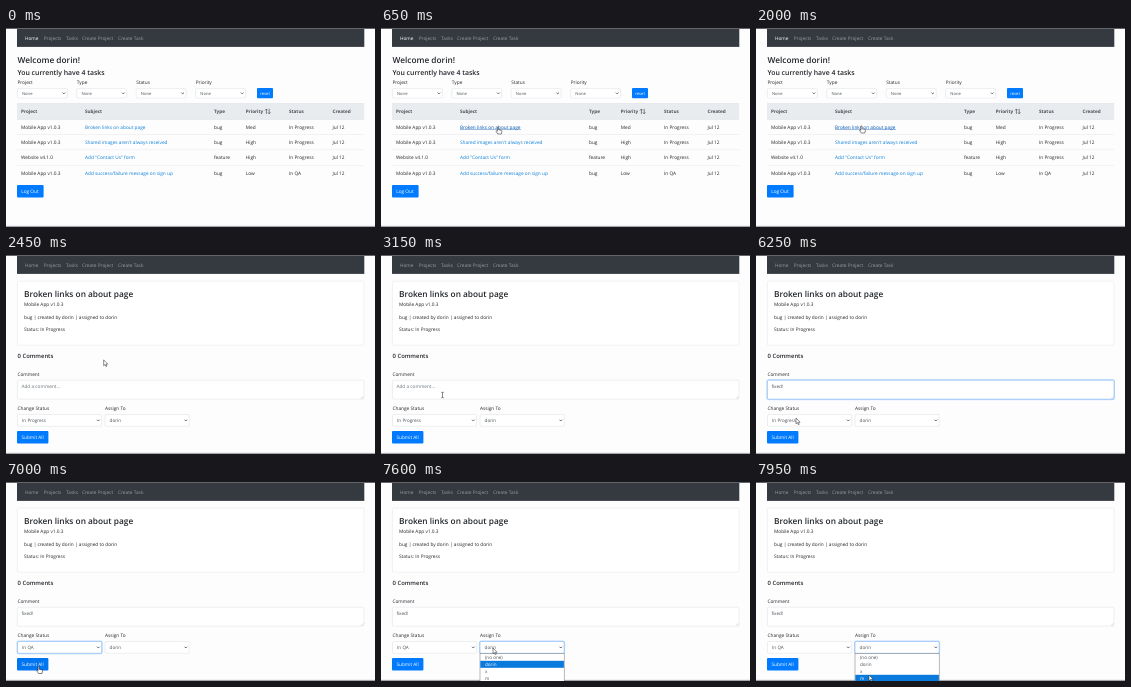
These frames come from a looping animation (369x199 px, 8000 ms). An HTML page:

```html
<!DOCTYPE html>
<html lang="en">
<head>
<meta charset="utf-8">
<title>Task tracker</title>
<style>
  html, body { margin: 0; width: 100%; height: 100%; overflow: hidden; background: #fefdfe; }
  svg { display: block; width: 369px; height: 199px; }
  text { font: 4.75px 'Open Sans', 'Noto Sans', sans-serif; fill: #212529; text-rendering: geometricPrecision; white-space: pre; }
  .h1 { font-size: 8.3px; font-weight: 600; }
  .h2 { font-size: 6.9px; font-weight: 600; }
  .h3 { font-size: 5.9px; font-weight: 600; }
  .th { font-size: 4.65px; font-weight: 700; fill: #495057; }
  .field { font-size: 4.6px; fill: #495057; }
  .small { font-size: 4.15px; }
  .nav { fill: #9a9da0; }
  .white { fill: #fff; }
  .hint { fill: #6c757d; }
  .link { fill: #0a7fd8; }
</style>
</head>
<body>
<svg id="stage" viewBox="0 0 369 199"></svg>
<script>
const LOOP = 8000, STEP = 50, USER = 'dorin';
const BLUE = '#007bff', BORDER = '#ced4da';

// Markup helpers
const text = (x, y, s, cls = '', id = '') => `<text x="${x}" y="${y}" class="${cls}" id="${id}">${s}</text>`;
const rect = (x, y, w, h, fill, extra = '') => `<rect x="${x}" y="${y}" width="${w}" height="${h}" fill="${fill}" ${extra}/>`;
const path = (d, stroke, width = 0.5, fill = 'none', extra = '') =>
  `<path d="${d}" stroke="${stroke}" stroke-width="${width}" fill="${fill}" ${extra}/>`;
const group = (id, body) => `<g id="${id}">${body}</g>`;
const box = (x, y, w, h, stroke = BORDER) => rect(x, y, w, h, '#fff', `rx="1.2" stroke="${stroke}" stroke-width=".4"`);
const chevron = (x, y) => path(`M${x - 1.3} ${y - 0.7}l1.3 1.3l1.3-1.3`, '#343a40', 0.75);
const button = (x, y, w, h, tx, ty, s, cls = 'white', id = '') =>
  rect(x, y, w, h, BLUE, `rx="1" id="${id}"`) + text(tx, ty, s, cls);
const select = (x, y, w, h, s, cls = 'field', id = '') =>
  box(x, y, w, h) + text(x + 4.6, y + h / 2 + 1.6, s, cls, id) + chevron(x + w - 3.4, y + h / 2);
const focusRing = (id, x, y, w, h) => group(id,
  rect(x - 0.5, y - 0.5, w + 1, h + 1, 'none', 'rx="1.6" stroke="#007bff" stroke-opacity=".25" stroke-width="1"') +
  rect(x, y, w, h, 'none', 'rx="1.2" stroke="#80bdff" stroke-width=".5"'));

const ROW = 7;
const menu = (id, x, options) => group(id,
  rect(x, 171.6, 84.2, options.length * ROW + 0.4, '#fff', 'stroke="#767676" stroke-width=".5"') +
  rect(x + 0.3, 171.8, 83.6, ROW, '#0a7adc', `id="${id}Mark"`) +
  options.map((s, i) => text(x + 5, 176.7 + i * ROW, s, 'field')).join(''));

function frameBars() {
  return rect(0, 0, 369, 0.8, '#3c4045') + rect(0, 197.9, 369, 0.8, '#85878a');
}

function navbar() {
  const items = [[19, 'Home'], [37.7, 'Projects'], [60, 'Tasks'], [76, 'Create Project'], [112, 'Create Task']];
  return rect(11, 1, 347.3, 17.9, '#343a40') +
    items.map(([x, s], i) => text(x, 12, s, 'nav', i ? '' : 'home')).join('');
}

function listPage() {
  const cols = [15, 79, 208, 239.7, 283, 326.5];
  const rows = [
    ['Mobile App v1.0.3', 'Broken links on about page', 'bug', 'Med', 'In Progress', 'Jul 12'],
    ['Mobile App v1.0.3', "Shared images aren't always received", 'bug', 'High', 'In Progress', 'Jul 12'],
    ['Website v4.1.0', 'Add "Contact Us" form', 'feature', 'High', 'In Progress', 'Jul 12'],
    ['Mobile App v1.0.3', 'Add success/failure message on sign up', 'bug', 'Low', 'In QA', 'Jul 12']
  ];
  const filters = [[11.4, 'Project'], [70.8, 'Type'], [130.2, 'Status'], [189.7, 'Priority']];
  const heads = ['Project', 'Subject', 'Type', 'Priority', 'Status', 'Created'];
  let out = text(11.5, 35.2, `Welcome ${USER}!`, 'h1') + text(11.5, 46.6, 'You currently have 4 tasks', 'h2');
  for (const [x, s] of filters)
    out += text(x, 56.2, s) + select(x, 60.6, 49.9, 9.4, 'None', 'field small');
  out += button(251, 60, 16, 10.2, 254.2, 66.7, 'reset', 'white small');
  out += rect(11, 75.2, 347.2, 16.1, '#e9ecef') + rect(11, 75.2, 347.2, 0.4, '#dee2e6') + rect(11, 90.9, 347.2, 0.6, '#d9dde1');
  heads.forEach((s, i) => { out += text(cols[i], 85, s, 'th'); });
  out += path('M260.4 86v-5m-1.3 1.4l1.3-1.4l1.3 1.4M263.2 80.8v5m-1.3-1.4l1.3 1.4l1.3-1.4', '#343a40', 0.6);
  rows.forEach((row, r) => {
    const y = 100.8 + r * 15.3;
    if (r) out += rect(11, y - 9.7, 347.2, 0.4, '#dee2e6');
    row.forEach((s, c) => { out += text(cols[c], y, s, c === 1 ? 'link' : '', c === 1 && !r ? 'task' : ''); });
  });
  out += group('underline', rect(79, 101.3, 61, 0.4, '#0056b3'));
  return out + button(11, 157, 26.6, 12.4, 15.2, 164.7, 'Log Out');
}

function detailPage() {
  const card = rect(11.4, 26.2, 346.6, 64, '#fff', 'id="card" rx="1.2" stroke="#dcdcde" stroke-width=".4"');
  const summary = group('summary', text(18, 41.5, 'Broken links on about page', 'h1') + text(18, 51.4, 'Mobile App v1.0.3'));
  const form = group('form',
    text(18, 64, '', '', 'meta') + text(18, 76.4, '', '', 'state') +
    text(11.5, 103.4, '0 Comments', 'h3') +
    text(11.5, 120.6, 'Comment') +
    box(11.4, 125.2, 346.6, 19) +
    focusRing('noteRing', 11.4, 125.2, 346.6, 19) +
    path('M355 143.6l2.2-2.2M356.4 143.6l.8-.8', '#888', 0.3) +
    text(15.4, 132.7, '', 'field', 'note') + rect(0, 128.3, 0.4, 5.3, '#333', 'id="caret"') +
    text(11.5, 155, 'Change Status') + text(99, 155, 'Assign To') +
    select(11.5, 159.5, 84.2, 11.8, 'In Progress', 'field', 'status') +
    select(99, 159.5, 84.2, 11.8, USER, 'field', 'assignee') +
    focusRing('statusRing', 11.5, 159.5, 84.2, 11.8) +
    focusRing('assignRing', 99, 159.5, 84.2, 11.8) +
    button(11, 176, 31.4, 12.4, 15.4, 183.8, 'Submit All', 'white', 'submit'));
  return card + summary + form;
}

function pointers() {
  const hand = 'M-.6 .2Q0-.5 .6 .2V2.8L3.4 3.4Q4 3.6 3.9 4.4L3.3 7H-.2L-2 4.2Q-1.8 3.3-.6 4.2Z';
  return group('arrow', path('M0 0V5.8L1.4 4.6L2.3 6.7L3.2 6.3L2.3 4.3H4.1Z', '#222', 0.5, '#fff')) +
    group('hand', path(hand, '#111', 0.5, '#fff')) +
    group('beam', path('M-1.2-2.8Q0-2.8 0-2.2Q0-2.8 1.2-2.8M0-2.4V2.4M-1.2 2.8Q0 2.8 0 2.2Q0 2.8 1.2 2.8', '#222', 0.55));
}

document.getElementById('stage').innerHTML =
  rect(0, 0, 369, 199, '#fefdfe') + navbar() +
  group('list', listPage()) + group('detail', detailPage()) + frameBars() +
  menu('statusMenu', 11.5, ['In Progress', 'In QA', 'Done']) +
  menu('assignMenu', 99, ['(no one)', USER, 'x', 'm']) +
  group('cursor', pointers());

const el = Object.fromEntries([...document.querySelectorAll('[id]')].filter(e => e.id).map(e => [e.id, e]));
const show = (id, on) => { el[id].style.display = on ? '' : 'none'; };
const clamp = v => Math.max(0, Math.min(1, v));
const during = (t, a, b) => t >= a && t < b;

// Pointer stops: time, x, y
const MOVES = [
  [250, 158, 173], [450, 140, 126], [650, 117, 99], [1150, 117, 99], [1200, 106, 98], [1800, 106, 98], [1850, 105.5, 98],
  [2350, 105.5, 98], [2700, 78, 122], [3150, 61.5, 140], [3500, 61.5, 140], [3700, 55.5, 133],
  [5600, 55.5, 133], [6000, 40.5, 156], [6100, 40.5, 156], [6250, 40, 163], [6350, 40, 165], [6600, 35, 181],
  [6750, 32.7, 184.5], [7000, 32.7, 184.5], [7400, 112, 165], [7600, 112, 166], [7950, 113, 193]
];
const KEYS = [[4350, 'f'], [4500, 'fi'], [4650, 'fix'], [4900, 'fixe'], [5050, 'fixed'], [5450, 'fixed!']];
const FOCUS = 3600, PICK_OPEN = 6350, PICK = 6650, ASSIGN = 7450, ASSIGN_OPEN = 7500;

function pointerAt(t) {
  let i = MOVES.findIndex(m => m[0] > t);
  if (i < 0) i = MOVES.length - 1;
  if (!i) return MOVES[0].slice(1);
  const [t0, x0, y0] = MOVES[i - 1], [t1, x1, y1] = MOVES[i];
  const k = clamp((t - t0) / (t1 - t0));
  return [x0 + (x1 - x0) * k, y0 + (y1 - y0) * k];
}

const ring = (id, t, on, off) => {
  el[id].style.opacity = clamp((t - on + STEP) / 150) * (1 - clamp((t - off + STEP) / 150));
};

function mark(id, row) {
  el[id + 'Mark'].setAttribute('y', 171.8 + row * ROW);
  [...el[id].querySelectorAll('text')].forEach((o, i) => { o.style.fill = i === row ? '#fff' : ''; });
}

function drawPointer(t, x, y, hand, beam) {
  show('cursor', t >= 250);
  el.cursor.setAttribute('transform', `translate(${x} ${y})`);
  show('hand', hand);
  show('beam', beam);
  show('arrow', !hand && !beam);
}

function drawNote(t) {
  const typed = KEYS.filter(k => k[0] <= t).pop();
  const since = t - (typed ? typed[0] : FOCUS);
  el.note.textContent = typed ? typed[1] : 'Add a comment...';
  el.note.setAttribute('class', typed ? 'field' : 'hint');
  show('caret', during(t, FOCUS, PICK_OPEN) && since % 1000 < 500);
  el.caret.setAttribute('x', 15.4 + (typed ? el.note.getComputedTextLength() + 0.2 : 0));
  ring('noteRing', t, FOCUS, PICK_OPEN);
}

function draw(t) {
  const [x, y] = pointerAt(t);
  const list = t < 2050, loaded = t >= 2350;
  const menuOpen = during(t, PICK_OPEN, PICK) || t >= ASSIGN_OPEN;
  const onTask = list && t >= 250 && x > 79 && x < 140 && y > 96 && y < 103;
  const onSubmit = !list && !menuOpen && x < 42.2 && y > 176;
  const onNote = loaded && y > 125 && y < 144.5;

  show('list', list);
  show('detail', !list);
  el.home.style.fill = list ? '#fff' : '';
  show('underline', onTask);
  el.task.style.fill = onTask ? '#0056b3' : '';

  // The card is shorter until its task arrives
  show('summary', loaded);
  el.card.setAttribute('height', loaded ? 64 : 46);
  el.form.setAttribute('transform', `translate(0 ${loaded ? 0 : -18})`);
  el.meta.textContent = loaded ? `bug | created by ${USER} | assigned to ${USER}` : '| created by | assigned to';
  el.state.textContent = loaded ? 'Status: In Progress' : 'Status:';
  el.assignee.textContent = loaded ? USER : '(no one)';
  el.status.textContent = t < PICK ? 'In Progress' : 'In QA';
  el.submit.setAttribute('fill', onSubmit ? '#0075f0' : BLUE);

  if (!list) drawNote(t);
  ring('statusRing', t, PICK_OPEN, ASSIGN);
  ring('assignRing', t, ASSIGN, LOOP * 2);

  const row = Math.floor((y - 171.6) / ROW);
  show('statusMenu', during(t, PICK_OPEN, PICK));
  show('assignMenu', t >= ASSIGN_OPEN);
  mark('statusMenu', Math.max(0, row));
  mark('assignMenu', row < 0 ? 1 : row);
  drawPointer(t, x, y, onTask || onSubmit, onNote);
}

const start = performance.now();
function tick() {
  const t = (performance.now() - start) % LOOP;
  draw(Math.floor(t / STEP) * STEP);
  requestAnimationFrame(tick);
}
tick();
</script>
</body>
</html>
```
